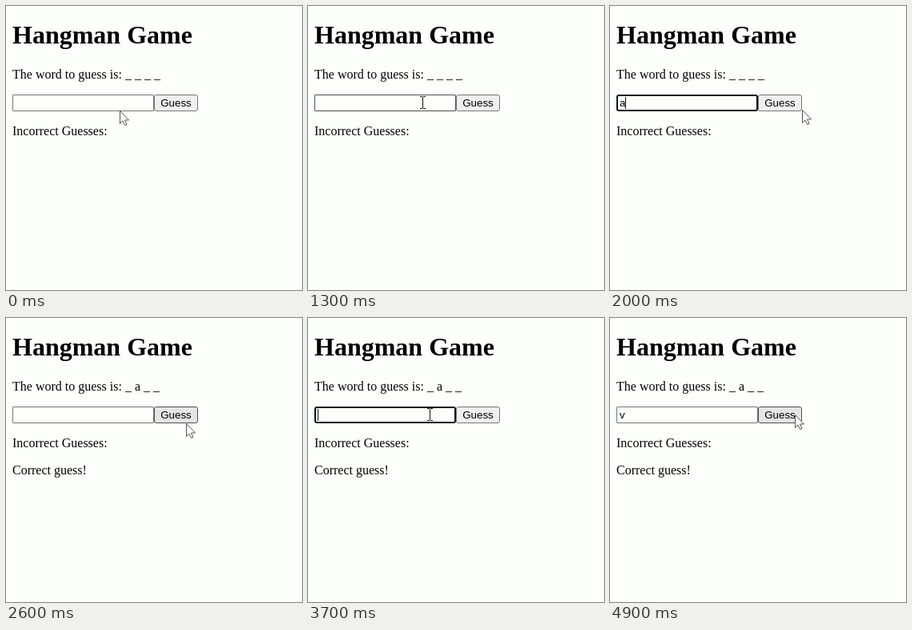
Animation, 370 px wide and 356 px high, one loop 5000 ms. Source, as an HTML page:

```html
<!DOCTYPE html>
<html lang="en">
<head>
<meta charset="utf-8">
<title>Hangman Game</title>
<style>
  html, body { margin: 0; height: 100%; overflow: hidden; background: #fdfffd; }
  svg { display: block; }
  text { font: 16px "Liberation Serif", "Times New Roman", serif; white-space: pre; }
  .title { font-size: 32px; font-weight: bold; }
  .control { font: 13.333px "Liberation Sans", Arial, sans-serif; }
  #field { fill: #fdfffd; stroke: #767676; }
  #button { fill: #efefef; stroke: #767676; }
  #button.hover { fill: #e5e5e5; }
  #field.hover, #button.hover { stroke: #4f4f4f; }
  #field.focus { stroke: #101010; stroke-width: 2; }
  #arrow { fill: #fff; stroke: #555; }
  #beam, #caret { fill: none; stroke: #111; }
</style>
</head>
<body>
<svg width="370" height="356" viewBox="0 0 370 356">
  <text class="title" x="8" y="47">Hangman Game</text>
  <text id="word" x="8" y="91"></text>
  <rect id="field"/>
  <text id="typed" class="control" x="12" y="126"></text>
  <path id="caret"/>
  <rect id="button" x="185.5" y="111.5" width="54" height="20" rx="2.5"/>
  <text class="control" x="212.5" y="126" text-anchor="middle">Guess</text>
  <text x="8" y="162">Incorrect Guesses:</text>
  <text id="message" x="8" y="196">Correct guess!</text>
  <path id="arrow" d="M.5 .5V16.5L4 13L6.5 18.5L9 17.5L6.5 12H11.5Z"/>
  <path id="beam" d="M-3 -7.5H0M1 -7.5H4M.5 -7V7M-3 7.5H0M1 7.5H4"/>
</svg>
<script>
const LOOP = 5000, STEP = 100;
const $ = id => document.getElementById(id);

// Pointer positions: [ms, x, y]
const route = [
  [0, 142, 131], [100, 142, 131], [600, 143, 121], [1600, 143, 121],
  [2000, 240, 130], [2300, 226, 127], [2600, 225, 131.5], [2900, 214, 130],
  [3200, 194, 126], [3400, 165, 122], [3600, 152, 121], [4000, 152, 121],
  [4400, 238, 121], [4500, 238, 121], [4800, 231, 121], [LOOP, 231, 121]
];

function pointerAt(t) {
  const i = route.findIndex(p => p[0] > t);
  const [t0, x0, y0] = route[i - 1], [t1, x1, y1] = route[i];
  const k = (t - t0) / (t1 - t0), ease = k * k * (3 - 2 * k);
  return [x0 + (x1 - x0) * ease, y0 + (y1 - y0) * ease];
}

function setField(focus, hover) {
  const inset = focus ? 1 : .5, field = $("field");
  const box = { x: 8 + inset, y: 111 + inset, width: 177 - 2 * inset, height: 21 - 2 * inset, rx: focus ? 2 : .5 };
  for (const key in box) field.setAttribute(key, box[key]);
  field.classList.toggle("focus", focus);
  field.classList.toggle("hover", hover);
}

function show(id, visible) {
  $(id).setAttribute("visibility", visible ? "visible" : "hidden");
}

function render(t) {
  const between = (a, b) => t >= a && t < b;
  const [x, y] = pointerAt(t);
  const overField = x >= 8 && x < 185 && y >= 111 && y < 131;
  const overButton = x >= 185 && x < 240 && y >= 111 && y < 132;
  const focus = between(1400, 2300) || between(3500, 4800);
  const typed = between(1600, 2400) ? "a" : t >= 4000 ? "v" : "";
  const solved = t >= 2400;

  $("word").textContent = "The word to guess is: _ " + (solved ? "a" : "_") + " _ _";
  $("typed").textContent = typed;
  setField(focus, overField);
  const caretX = Math.floor(12 + $("typed").getComputedTextLength()) + .5;
  $("caret").setAttribute("d", `M${caretX} 114V129`);
  $("button").classList.toggle("hover", overButton);
  show("caret", focus);
  show("message", solved);
  show("arrow", !overField);
  show("beam", overField);
  for (const id of ["arrow", "beam"]) {
    $(id).setAttribute("transform", `translate(${Math.round(x)} ${Math.round(y)})`);
  }
}

const start = performance.now();
function tick() {
  const t = (performance.now() - start) % LOOP;
  render(Math.floor(t / STEP) * STEP);
  requestAnimationFrame(tick);
}
tick();
</script>
</body>
</html>
```
